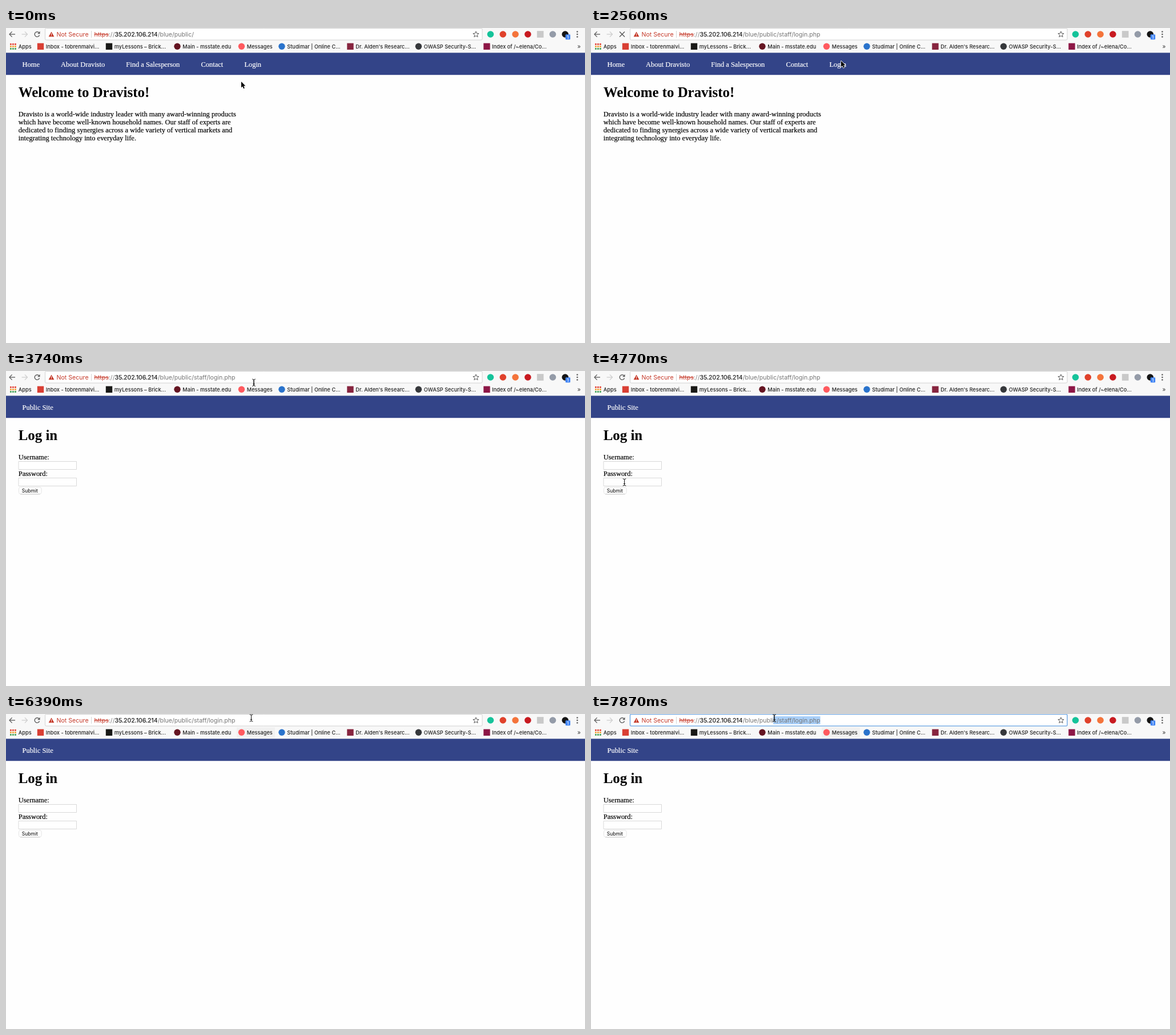
Write an HTML page with a canvas that moves like this. It is 1014 by 552 pixels and loops after 8000 ms.

```html
<!DOCTYPE html>
<html lang="en">
<head>
<meta charset="utf-8">
<title>Login page visit</title>
<style>
  html, body { margin: 0; width: 100%; height: 100%; overflow: hidden; background: #fefefe; }
  canvas { display: block; width: 1014px; height: 552px; }
</style>
</head>
<body>
<canvas id="stage"></canvas>
<script>
const W = 1014, H = 552, LOOP = 8000, REFRESH = 147;
const canvas = document.getElementById('stage');
const ratio = window.devicePixelRatio || 1;
canvas.width = W * ratio;
canvas.height = H * ratio;
const ctx = canvas.getContext('2d');
ctx.scale(ratio, ratio);
ctx.lineJoin = 'round';

const SANS = 'Inter, Roboto, sans-serif';
const SERIF = '"Liberation Serif", "Times New Roman", serif';
const URL_FONT = '10.6px ' + SANS;
const MARK_FONT = '500 9.2px ' + SANS;
const BODY_FONT = '12.45px ' + SERIF;
const HEAD_FONT = 'bold 24.9px ' + SERIF;
const ICON = '#5a5a5a', ALERT = '#c53929';

// Moments of the visit
const LINKED = 620, LOADING = 1070, ADDRESS = 1510, ARRIVED = 2710, HOVERED = 5800, FOCUSED = 6680;

// Pointer moves: start, end, and where each one leads
const HOME = { x: 412, y: 94 };
const MOVES = [
  { from: 150, to: 320, x: 436, y: 49 },
  { from: LINKED, to: 770, x: 438, y: 58 },
  { from: 2560, to: 3590, x: 437, y: 19 },
  { from: 3740, to: 4770, x: 58.5, y: 195 },
  { from: 4920, to: 5940, x: 438, y: 17 },
  { from: 6090, to: 6390, x: 429.5, y: 7 },
  { from: FOCUSED, to: 7870, x: 321, y: 7 }
];

const ease = k => k < .5 ? 4 * k ** 3 : 1 - 4 * (1 - k) ** 3;

// The screen refreshes in steps, so each move advances in steps too
function pointerAt(t) {
  let { x, y } = HOME;
  for (const move of MOVES) {
    if (t < move.from) break;
    const gaps = Math.round((move.to - move.from) / REFRESH);
    const done = Math.floor((t - move.from) / (move.to - move.from) * gaps + 1e-6) + 1;
    const k = ease(Math.min(1, done / (gaps + 1)));
    x += (move.x - x) * k;
    y += (move.y - y) * k;
  }
  return { x, y };
}

function rect(x, y, w, h, color) {
  ctx.fillStyle = color;
  ctx.fillRect(x, y, w, h);
}

function dot(x, y, r, color) {
  ctx.fillStyle = color;
  ctx.beginPath();
  ctx.arc(x, y, r, 0, Math.PI * 2);
  ctx.fill();
}

function badge(x, y, size, color, square) {
  if (square) rect(x - size, y - size, size * 2, size * 2, color);
  else dot(x, y, size, color);
}

function box(x, y, w, h, r, fill, stroke, width = 1) {
  ctx.beginPath();
  ctx.roundRect(x, y, w, h, r);
  ctx.fillStyle = fill;
  ctx.fill();
  ctx.strokeStyle = stroke;
  ctx.lineWidth = width;
  ctx.stroke();
}

// Draws a label and returns where it ends
function text(str, x, y, font, color, weight = 0) {
  ctx.font = font;
  ctx.fillStyle = color;
  ctx.fillText(str, x, y);
  if (weight) {
    ctx.strokeStyle = color;
    ctx.lineWidth = weight;
    ctx.strokeText(str, x, y);
  }
  return x + ctx.measureText(str).width;
}

const body = (str, x, y, color = '#000') => text(str, x, y, BODY_FONT, color, .2);

function shape(points, fill) {
  ctx.beginPath();
  for (const [x, y] of points) ctx.lineTo(x, y);
  ctx.closePath();
  if (fill) {
    ctx.fillStyle = fill;
    ctx.fill();
  }
}

function line(color, width, ...points) {
  ctx.beginPath();
  for (const [x, y] of points) ctx.lineTo(x, y);
  ctx.strokeStyle = color;
  ctx.lineWidth = width;
  ctx.stroke();
}

function navArrow(x, dir, color) {
  const y = 11, tip = x + 5 * dir, bend = x + .4 * dir;
  line(color, 1.3, [x - 5 * dir, y], [tip, y]);
  line(color, 1.3, [bend, y - 4.6], [tip, y], [bend, y + 4.6]);
}

function reloadIcon(x, y) {
  ctx.strokeStyle = ICON;
  ctx.lineWidth = 1.4;
  ctx.beginPath();
  ctx.arc(x, y, 4.3, .35, Math.PI * 1.75);
  ctx.stroke();
  shape([[x + 5, y - 5.3], [x + 5, y - .8], [x + .5, y - .8]], ICON);
}

function stopIcon(x, y) {
  for (const s of [-1, 1]) line(ICON, 1.4, [x - 4.5, y - 4.5 * s], [x + 4.5, y + 4.5 * s]);
}

function star(cx, cy) {
  shape(Array.from({ length: 10 }, (_, i) => {
    const a = -Math.PI / 2 + i * Math.PI / 5, r = i % 2 ? 2.4 : 5.4;
    return [cx + Math.cos(a) * r, cy + Math.sin(a) * r];
  }));
  ctx.strokeStyle = ICON;
  ctx.lineWidth = 1;
  ctx.stroke();
}

// Selects from the letter edge nearest the pointer to the end
function selection(path, left, pointerX) {
  const edge = n => left + ctx.measureText(path.slice(0, n)).width;
  let n = path.length;
  while (n > 0 && (edge(n) + edge(n - 1)) / 2 > pointerX) n--;
  rect(edge(n), 4, edge(path.length) - edge(n), 14, '#a9cff8');
}

function addressBar(t, pointer) {
  const focused = t >= FOCUSED, base = 15;
  box(68.5, .5, 765.5, 20.5, 2, '#fff', focused ? '#7db1e8' : '#d2d2d2', focused ? 1.6 : 1);
  shape([[79.5, 6.5], [84.4, 15.2], [74.6, 15.2]], ALERT);
  rect(79, 9.3, 1, 3, '#fff');
  rect(79, 13.1, 1, 1, '#fff');
  text('Not Secure', 88.5, base, URL_FONT, ALERT);
  rect(149, 5, 1, 12, '#d4d4d4');

  const path = '/blue/public/' + (t >= ADDRESS ? 'staff/login.php' : '');
  const start = 154.5;
  let x = text('https', start, base, URL_FONT, ALERT);
  rect(start, 10.8, x - start, 1, ALERT);
  x = text('://', x, base, URL_FONT, '#808080');
  x = text('35.202.106.214', x, base, URL_FONT, '#1c1c1c', .2);
  if (focused) selection(path, x, pointer.x);
  text(path, x, base, URL_FONT, '#757575');
  star(823, 11.3);
}

function extensions() {
  ['#15c39a', '#e0412b', '#f4743b', '#c81a20', '#c9c9c9', '#949ba8', '#151515']
    .forEach((color, i) => badge(848.5 + i * 21.8, 11, 5.8, color, i === 4));
  box(980, 11.5, 8, 8.5, 1, '#4285f4', '#4285f4', .5);
  text('1', 982.3, 18.6, '500 7.5px ' + SANS, '#fff');
  for (let i = 0; i < 3; i++) dot(1000.5, 6.5 + i * 4.5, 1.3, ICON);
}

const MARKS = [
  { x: 60.5, label: 'Inbox - tobrenmalvi...', color: '#d93f34', square: true },
  { x: 180.5, label: 'myLessons – Brick...', color: '#191917', square: true },
  { x: 300, label: 'Main - msstate.edu', color: '#651522' },
  { x: 412.5, label: 'Messages', color: '#ff5a5f' },
  { x: 483, label: 'Studimar | Online C...', color: '#2a73cc' },
  { x: 603, label: "Dr. Alden's Researc...", color: '#87253f', square: true },
  { x: 722.5, label: 'OWASP Security-S...', color: '#36383b' },
  { x: 842, label: 'Index of /~elena/Co...', color: '#8d1746', square: true }
];

function bookmarks(t) {
  if (t >= HOVERED) rect(404, 23.5, 67, 18, '#f1f1f1');
  const hues = ['#e5483c', '#f2a33a', '#46a35a'];
  for (let i = 0; i < 9; i++) {
    const row = Math.floor(i / 3);
    rect(7 + i % 3 * 4, 27 + row * 4, 2.8, 2.8, hues[row]);
  }
  text('Apps', 21.8, 36, MARK_FONT, '#222');
  for (const { x, label, color, square } of MARKS) {
    badge(x, 32.3, 5.7, color, square);
    text(label, x + 9.3, 36, MARK_FONT, '#222');
  }
  text('»', 1000.5, 35.5, '500 10px ' + SANS, '#555');
}

function browser(t, pointer) {
  rect(0, 0, W, 44, '#f8f8f8');
  navArrow(11, -1, ICON);
  navArrow(32.5, 1, '#cfcfcf');
  if (t >= LOADING && t < ARRIVED) stopIcon(54.5, 11);
  else reloadIcon(54.5, 11);
  addressBar(t, pointer);
  extensions();
  bookmarks(t);
}

function header(title, ...links) {
  rect(0, 43.4, W, 38.8, '#334488');
  let x = 28.5;
  for (const label of links) x = body(label, x, 67.6, '#fff') + 37.2;
  text(title, 21.7, 121.3, HEAD_FONT, '#000');
}

function homePage() {
  header('Welcome to Dravisto!', 'Home', 'About Dravisto', 'Find a Salesperson', 'Contact', 'Login');
  [
    'Dravisto is a world-wide industry leader with many award-winning products',
    'which have become well-known household names. Our staff of experts are',
    'dedicated to finding synergies across a wide variety of vertical markets and',
    'integrating technology into everyday life.'
  ].forEach((row, i) => body(row, 21.8, 155.4 + i * 14));
}

function loginPage() {
  header('Log in', 'Public Site');
  ['Username:', 'Password:'].forEach((label, i) => {
    const y = 155.4 + i * 29;
    body(label, 21.8, y);
    box(22, y + 3.1, 101.5, 14, 0, '#fff', '#d9d9d9');
  });
  box(22.5, 203.5, 39.5, 12, 3, '#fff', '#dedede', .8);
  line('#bdbdbd', .8, [25, 215.8], [59.5, 215.8]);
  text('Submit', 27.8, 212.8, '8.5px ' + SANS, '#000');
}

function outlined(fill, stroke, width) {
  ctx.strokeStyle = stroke;
  ctx.lineWidth = width;
  ctx.stroke();
  ctx.fillStyle = fill;
  ctx.fill();
}

function handPointer() {
  ctx.beginPath();
  ctx.roundRect(-1.2, 0, 2.4, 9, 1.2);
  ctx.roundRect(-2.6, 5.5, 9, 8, 2.5);
  outlined('#fff', '#000', 1.6);
  for (let i = 0; i < 3; i++) line('#000', .6, [1 + i * 1.8, 9], [1 + i * 1.8, 12]);
}

function textPointer() {
  for (const s of [-1, 1]) line('#111', 1, [2.8 * s, -6.3], [0, -5], [0, 5], [2.8 * s, 6.3]);
  line('#111', 1, [-1.6, 2.5], [1.6, 2.5]);
}

function arrowPointer() {
  shape([[0, 0], [0, 10.4], [2.4, 8.2], [4.1, 12.2], [5.8, 11.4], [4.2, 7.5], [7.4, 7.4]]);
  outlined('#000', '#fff', 1.5);
}

function drawPointer(t, { x, y }) {
  const overField = t >= ARRIVED && x < 124 && y > 158 && y < 202;
  ctx.save();
  ctx.translate(x, y);
  if (t >= LINKED && t < 2560) handPointer();
  else if (y < 22 || overField) textPointer();
  else arrowPointer();
  ctx.restore();
}

function render(t) {
  const pointer = pointerAt(t);
  rect(0, 0, W, H, '#fefefe');
  browser(t, pointer);
  if (t < ARRIVED) homePage();
  else loginPage();
  drawPointer(t, pointer);
}

const start = performance.now();
function tick() {
  render((performance.now() - start) % LOOP);
  requestAnimationFrame(tick);
}
tick();
</script>
</body>
</html>
```
